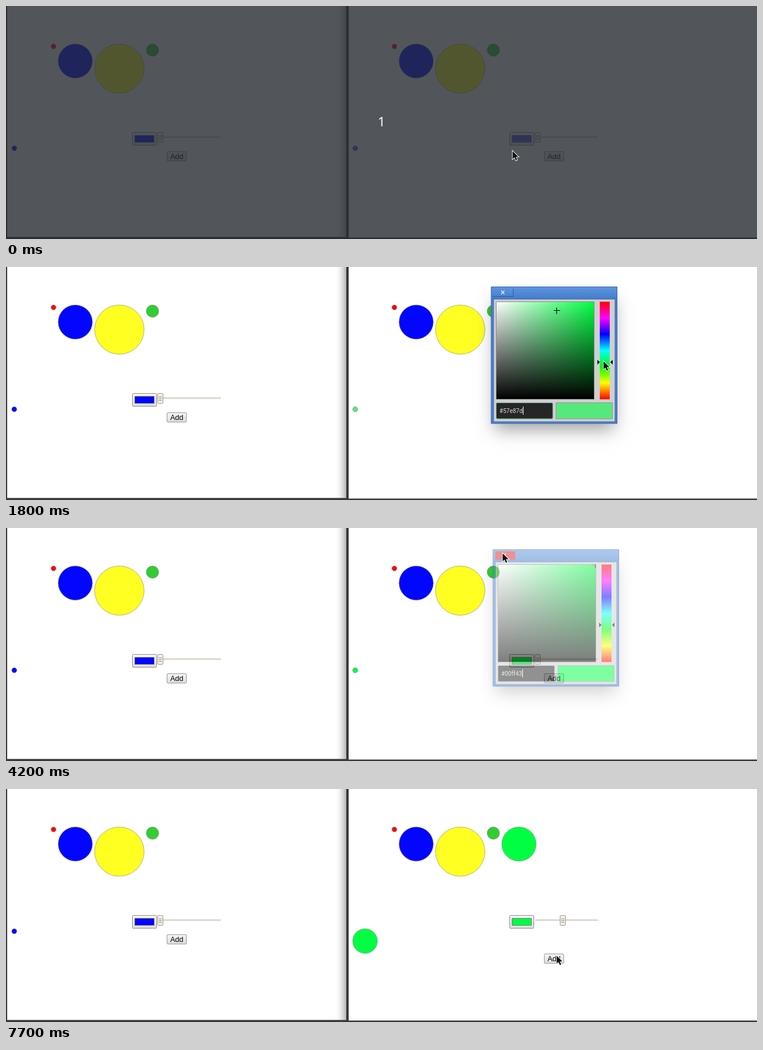
Animation, 1280 px wide and 399 px high, one loop 8000 ms. Source, as an HTML page with a canvas:

```html
<!DOCTYPE html>
<html lang="en">
<head>
<meta charset="utf-8">
<title>Colour picker demo</title>
<style>
html, body { margin: 0; width: 100%; height: 100%; overflow: hidden; background: #fff; }
canvas { display: block; }
</style>
</head>
<body>
<canvas id="stage" width="1280" height="399"></canvas>
<script>
const LOOP = 8000, STEP = 100;
const BLUE = '#0206ff', BLUE_HUE = 240, GREEN_HUE = 135.75;
const SV = { x: 835.5, y: 59.5, size: 167 };
const ROW = [[4.2, '#f00'], [29.2, BLUE], [42.2, '#ffff22'], [10.6, '#32cd32']];

// Pointer moves: start time, end time, destination
const MOVES = [
  [400, 700, 877, 231], [1000, 1100, 879, 232], [1100, 1400, 986, 208],
  [1500, 1700, 1018, 161], [2300, 2500, 947, 81], [2600, 3000, 1025, 62],
  [3100, 3300, 1018, 58], [3500, 4000, 846, 43], [4600, 5000, 924, 253],
  [5000, 5300, 902, 221], [5500, 5700, 945, 220], [6500, 6700, 912, 258],
  [6800, 7000, 930, 322], [7000, 7200, 938, 285]
];

const ctx = document.getElementById('stage').getContext('2d');
const layer = document.createElement('canvas');
layer.width = 1280;
layer.height = 399;
const dlg = layer.getContext('2d');

const lerp = (a, b, k) => a + (b - a) * k;
const ramp = (t, from, to) => Math.max(0, Math.min(1, (t + STEP - from) / (to - from)));

function hsv(h, s, v) {
  const channel = n => {
    const k = (n + h / 60) % 6;
    return Math.round(255 * v * (1 - s * Math.max(0, Math.min(k, 4 - k, 1))));
  };
  return '#' + [5, 3, 1].map(n => channel(n).toString(16).padStart(2, '0')).join('');
}

function gradient(c, x0, y0, x1, y1, colors) {
  const g = c.createLinearGradient(x0, y0, x1, y1);
  colors.forEach((color, i) => g.addColorStop(i / (colors.length - 1), color));
  return g;
}

function box(c, x, y, w, h, fill, stroke, radius = 0) {
  c.beginPath();
  c.roundRect(x, y, w, h, radius);
  if (fill) { c.fillStyle = fill; c.fill(); }
  if (stroke) { c.strokeStyle = stroke; c.lineWidth = 1; c.stroke(); }
}

function shape(c, points, fill, stroke) {
  c.beginPath();
  points.forEach(([x, y]) => c.lineTo(x, y));
  c.closePath();
  if (stroke) { c.strokeStyle = stroke; c.lineWidth = 1.8; c.stroke(); }
  c.fillStyle = fill;
  c.fill();
}

function lines(c, color, width, ...segments) {
  c.beginPath();
  for (const [x0, y0, x1, y1] of segments) { c.moveTo(x0, y0); c.lineTo(x1, y1); }
  c.strokeStyle = color;
  c.lineWidth = width;
  c.stroke();
}

function text(c, str, x, y, font, color, align = 'left') {
  c.font = font;
  c.fillStyle = color;
  c.textAlign = align;
  c.fillText(str, x, y);
}

// Circle placed by its top left corner
function circle(left, top, r, color) {
  ctx.beginPath();
  ctx.arc(left + r, top + r, r, 0, 2 * Math.PI);
  ctx.fillStyle = color;
  ctx.fill();
  ctx.strokeStyle = '#80808099';
  ctx.lineWidth = 1;
  ctx.stroke();
}

function circleRow(left, items) {
  for (const [r, color] of items) {
    circle(left, 65, r, color);
    left += 2 * r + 3.7;
  }
}

function controls(dx, color, slide, hot, pressed, drop) {
  box(ctx, dx + 215.5, 216.5, 41, 22, gradient(ctx, 0, 216, 0, 239, ['#f8f8f8', '#dedede']), '#8c8c8c', 1);
  box(ctx, dx + 219.5, 221.5, 33, 12, color, '#777');

  box(ctx, dx + 259, 223, 107, 3, '#dfd9d0');
  const x = dx + 258.5 + slide;
  box(ctx, x, 216.5, 9, 17, hot ? '#fff' : '#f2efe9', '#9c978d', 1);
  for (let y = 222.5; y < 230; y += 3) lines(ctx, '#8d887e', 1, [x + 2, y, x + 7, y]);

  const fill = pressed ? ['#d2d2d2', '#e6e6e6'] : ['#f6f6f6', '#dcdcdc'];
  box(ctx, dx + 274.5, drop + 249.5, 33, 16, gradient(ctx, 0, drop + 249, 0, drop + 266, fill), '#999', 1.5);
  text(ctx, 'Add', dx + 291, drop + 262, '12.5px "Liberation Sans", Arial, sans-serif', '#000', 'center');
}

function page(t, color) {
  box(ctx, 0, 0, 1280, 399, '#383838');
  box(ctx, 2, 0, 578, 395.5, '#fff');
  box(ctx, 584, 0, 696, 396.5, '#fff');
  const shade = Array.from({ length: 6 }, (_, i) => `rgba(0,0,0,${0.3 * (i / 5) ** 2})`);
  box(ctx, 560, 0, 20, 395.5, gradient(ctx, 560, 0, 580, 0, shade));

  const slide = 43 * ramp(t, 5500, 5700);
  const r = 4.3 + slide * 0.39;
  circleRow(76.8, ROW);
  circleRow(657.8, t >= 7600 ? [...ROW, [29.3, color]] : ROW);
  circle(9.8, 239.3, 4.3, BLUE);
  circle(590.9, 239.3, r, color);

  controls(0, BLUE, 0, false, false, 0);
  controls(643, color, slide, t >= 5200 && t < 6500, t === 7500, Math.round(slide * 0.77));
}

function drawDialog(t, hue, cx, cy, color) {
  dlg.clearRect(0, 0, 1280, 399);
  dlg.save();
  dlg.shadowColor = 'rgba(0,0,0,.36)';
  dlg.shadowBlur = 28;
  dlg.shadowOffsetY = 17;
  box(dlg, 833, 40, 203, 222, '#4a80cf');
  dlg.restore();
  box(dlg, 827, 34, 214.5, 234, '#4a80cf', '#3a66ad');
  box(dlg, 828, 35, 213, 20, gradient(dlg, 0, 35, 0, 55, ['#5c94e0', '#437cca']));
  box(dlg, 831, 55, 207, 210, '#cfcfd0', '#3a66ad');

  // close button
  if (t >= 3900) box(dlg, 831, 37, 34, 14, '#e0242b');
  else lines(dlg, '#315d9f', 1, [829, 50.5, 865, 50.5], [864.5, 37, 864.5, 51]);
  lines(dlg, '#e8eef8', 1.3, [844, 40.5, 849.5, 46.5], [849.5, 40.5, 844, 46.5]);

  // saturation and value
  const { x, y, size } = SV;
  box(dlg, x, y, size, size, gradient(dlg, x, 0, x + size, 0, ['#fff', hsv(hue, 1, 1)]));
  box(dlg, x, y, size, size, gradient(dlg, 0, y, 0, y + size, ['rgba(0,0,0,0)', '#000']), '#8a8a8a');
  dlg.save();
  dlg.beginPath();
  dlg.rect(x, y, size, size);
  dlg.clip();
  const mx = Math.floor(cx) - 0.5, my = Math.round(cy) - 0.5;
  lines(dlg, '#000', 1.1, [mx - 5, my, mx + 6, my], [mx, my - 5, mx, my + 6]);
  dlg.restore();

  // hue strip
  const rainbow = Array.from({ length: 7 }, (_, i) => hsv(360 - 60 * i, 1, 1));
  box(dlg, 1012, y, 17, size, gradient(dlg, 0, y, 0, y + size, rainbow));
  const hy = Math.floor(y + size * (1 - hue / 360));
  shape(dlg, [[1008, hy - 4], [1012, hy], [1008, hy + 4]], '#000');
  shape(dlg, [[1034, hy - 4], [1030, hy], [1034, hy + 4]], '#000');

  // hex field and preview
  box(dlg, 835.5, 232.5, 96.5, 27.5, '#262626', '#7fb5aa', 2);
  text(dlg, color, 841, 249.5, '10px Roboto, "Noto Sans", sans-serif', '#dadada');
  if (Math.floor(t / 600) % 2) {
    const end = Math.round(841 + dlg.measureText(color).width) + 0.5;
    lines(dlg, '#fff', 1, [end, 239, end, 253]);
  }
  box(dlg, 937.5, 232.5, 96, 27.5, color, '#8f9299');
}

function pointer(t) {
  let x = 863, y = 248;
  for (const [from, to, toX, toY] of MOVES) {
    const k = ramp(t, from, to);
    x = lerp(x, toX, k);
    y = lerp(y, toY, k);
  }
  ctx.save();
  ctx.translate(Math.round(x), Math.round(y));
  if (t === 1000) {
    const beam = [[-3, -6, 3, -6], [0, -6, 0, 6], [-3, 6, 3, 6]];
    lines(ctx, '#222', 3, ...beam);
    lines(ctx, '#fff', 1.2, ...beam);
  } else {
    shape(ctx, [[0.5, 0.5], [0.5, 14], [3.7, 11.2], [6, 16.5], [8.2, 15.6], [6, 10.4], [10.3, 10.2]], '#111', '#fff');
  }
  ctx.restore();
}

function draw(t) {
  const hue = t < 1800 ? BLUE_HUE : GREEN_HUE;
  const drag = ramp(t, 2600, 3000);
  const sat = lerp(0.625, 1, drag), val = lerp(0.91, 1, drag);
  const color = hsv(hue, sat, val);
  page(t, color);

  const shown = ramp(t, 800, 1100) * (1 - ramp(t, 4100, 4500));
  if (shown) {
    drawDialog(t, hue, SV.x + SV.size * sat, SV.y + SV.size * (1 - val), color);
    const shift = 6 * (1 - shown);
    ctx.globalAlpha = shown;
    ctx.drawImage(layer, shift, shift);
    ctx.globalAlpha = 1;
  }

  const dim = 1 - ramp(t, 100, 300);
  if (dim) {
    box(ctx, 0, 0, 1280, 399, `rgba(39,44,51,${0.8 * dim})`);
    text(ctx, '1', 640, 206, '22px "Noto Sans", "Open Sans", sans-serif', `rgba(255,255,255,${dim})`, 'center');
  }
  pointer(t);
}

const start = performance.now();
function tick() {
  const t = (performance.now() - start) % LOOP;
  draw(Math.floor(t / STEP) * STEP);
  requestAnimationFrame(tick);
}
tick();
</script>
</body>
</html>
```
